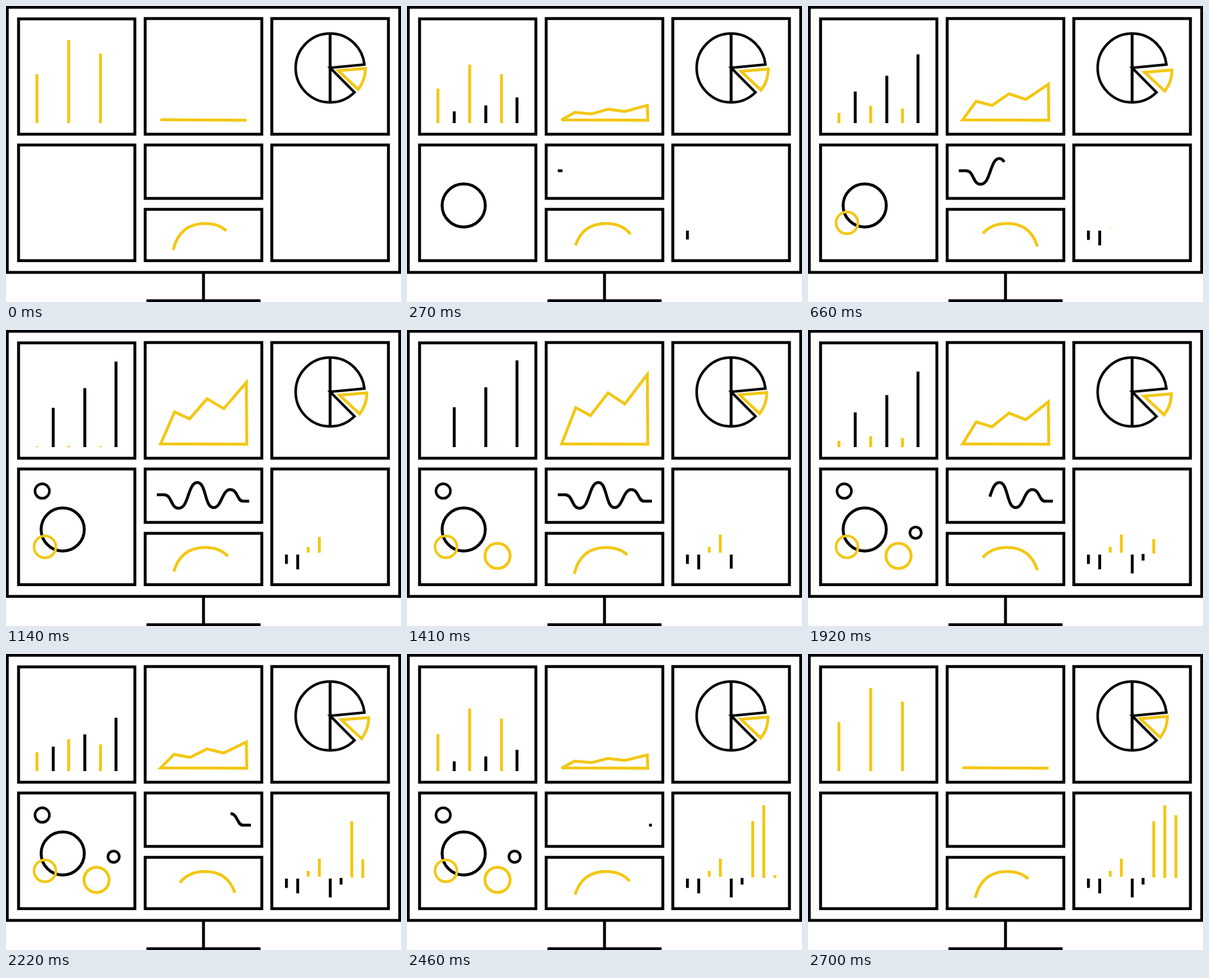
An HTML page with a canvas that plays this animation: 613x460 px, repeating every 2730 ms.

```html
<!DOCTYPE html>
<html lang="en">
<head>
<meta charset="utf-8">
<title>Dashboard</title>
<style>
html, body { margin: 0; width: 100%; height: 100%; overflow: hidden; background: #fff; }
canvas { display: block; }
</style>
</head>
<body>
<canvas id="stage" width="613" height="460"></canvas>
<script>
const ctx = document.getElementById('stage').getContext('2d');
const LOOP = 2730, CYCLE = 2700, HALF = CYCLE / 2, STEP = 30;
const BLACK = '#000', YELLOW = '#f3c713', LINE = 4.5;

const clamp = v => Math.min(1, Math.max(0, v));
const cubicInOut = x => x < .5 ? 4 * x ** 3 : 1 - 4 * (1 - x) ** 3;

function bezierEase(x1, y1, x2, y2) {
  const at = (a, b, u) => 3 * a * u * (1 - u) ** 2 + 3 * b * u * u * (1 - u) + u ** 3;
  return x => {
    let lo = 0, hi = 1;
    for (let i = 0; i < 24; i++) {
      const mid = (lo + hi) / 2;
      if (at(x1, x2, mid) < x) lo = mid; else hi = mid;
    }
    return at(y1, y2, (lo + hi) / 2);
  };
}
const ease = bezierEase(.25, .1, .25, 1);
const easeInOut = bezierEase(.42, 0, .58, 1);

// 0 -> 1 -> 0 over one period
const triangle = (t, period) => 1 - Math.abs(1 - 2 * (t % period) / period);

function stroke(color, path, width = LINE) {
  ctx.strokeStyle = color;
  ctx.lineWidth = width;
  ctx.stroke(path);
}

function line(color, x1, y1, x2, y2, width) {
  const p = new Path2D();
  p.moveTo(x1, y1);
  p.lineTo(x2, y2);
  stroke(color, p, width);
}

function box(x1, y1, x2, y2) {
  const p = new Path2D();
  p.rect(x1, y1, x2 - x1, y2 - y1);
  stroke(BLACK, p);
}

function tracedPath(d) {
  const el = document.createElementNS('http://www.w3.org/2000/svg', 'path');
  el.setAttribute('d', d);
  return { path: new Path2D(d), length: el.getTotalLength() };
}

function strokePart(color, path, from, to) {
  if (to - from < .05) return;
  ctx.setLineDash([to - from, 2000]);
  ctx.lineDashOffset = -from;
  stroke(color, path);
  ctx.setLineDash([]);
}

const wave = tracedPath('M234 256H245C258 256 255 277 268 277C284 277 282 237 297 237' +
  'C311 237 308 276 322 276C335 276 335 248 348 248C360 248 358 266 368 266H380');
const gauge = new Path2D('M259.5 379C266.5 350 284 338 309 338C334 338 350.5 350 357.5 379');

function drawScreen() {
  box(2, 2, 611, 414);
  for (const [x1, x2] of [[19.5, 200], [216, 397], [412.5, 593.5]]) {
    box(x1, x1 < 100 ? 20 : 19.5, x2, 199.3);
    if (x1 !== 216) box(x1, 216, x2, 395.7);
  }
  box(216, 216, 397, 299);
  box(216, 316, 397, 395.7);
  line(BLACK, 306.5, 414, 306.5, 458);
  line(BLACK, 218, 458, 395, 458);
}

function drawBars(t) {
  const k = ease(triangle(t, CYCLE));
  const bar = (color, x, h) => h > .05 && line(color, x, 182, x, 182 - h);
  [[48, 76], [97.3, 129], [146.6, 108]].forEach(([x, h]) => bar(YELLOW, x, h * (1 - k)));
  [[73.3, 62], [122.3, 93], [170.7, 135]].forEach(([x, h]) => bar(BLACK, x, h * k));
}

function drawArea(t) {
  const k = triangle(t, CYCLE);
  if (k === 0) return line(YELLOW, 239.5, 176.8, 373.5, 177.4);
  const p = new Path2D();
  p.moveTo(240, 177);
  [[260 + 2 * k, 59], [286.5 - 2 * k, 46], [312, 83], [338, 65], [373, 113]]
    .forEach(([x, h]) => p.lineTo(x, 177 - h * k));
  p.lineTo(373.7, 177.4);
  p.closePath();
  ctx.miterLimit = 3.6;
  stroke(YELLOW, p);
  ctx.miterLimit = 10;
}

function drawPie(t) {
  const pie = new Path2D();
  pie.moveTo(503, 96);
  pie.arc(503, 96.3, 53.5, Math.PI / 4, Math.PI * 2 - .1);
  pie.closePath();
  stroke(BLACK, pie, 4);
  line(BLACK, 503, 43, 503, 150);

  const k = triangle(t, HALF), dx = 7.2 * k, dy = 2.6 * k;
  const slice = new Path2D();
  slice.moveTo(515.5 + dx, 100.5 + dy);
  slice.arc(504.5 + dx, 97 + dy, 53.3, 0, .66);
  slice.closePath();
  stroke(YELLOW, slice);
}

function drawCircles(t) {
  [[88, 310, 33.5, BLACK], [60.5, 337, 17, YELLOW], [56.2, 250.3, 11.2, BLACK],
   [140.5, 351, 19.5, YELLOW], [167, 315, 8.8, BLACK]].forEach(([x, y, r, color], i) => {
    if (t < 100 + 367 * i) return;
    const p = new Path2D();
    p.arc(x, y, r, 0, Math.PI * 2);
    stroke(color, p, r < 18 ? 4 : LINE);
  });
}

function drawWave(t) {
  const head = cubicInOut(clamp(t / HALF)), tail = cubicInOut(clamp(t / HALF - 1));
  strokePart(BLACK, wave.path, wave.length * tail, wave.length * head);
}

function drawGauge(t) {
  const shift = 28.5 * cubicInOut(triangle(t, HALF));
  strokePart(YELLOW, gauge, shift, shift + 106);
}

function drawCandles(t) {
  [[435.2, 349, 363.5], [452.7, 349, 372], [469, 346, 337], [486.3, 346, 318],
   [503.2, 349, 378.3], [520, 348, 358.3], [536.6, 347.3, 260], [553.7, 348, 235],
   [571, 348, 250]].forEach(([x, from, to], i) => {
    const k = easeInOut(clamp((t - 15 - 300 * i) / 300));
    if (k > .001) line(to > from ? BLACK : YELLOW, x, from, x, from + (to - from) * k);
  });
}

function draw(now) {
  const t = Math.floor(now % LOOP / STEP) * STEP;
  const cycle = t % CYCLE;
  ctx.fillStyle = '#fff';
  ctx.fillRect(0, 0, 613, 460);
  drawScreen();
  [drawBars, drawArea, drawPie, drawCircles, drawWave, drawGauge].forEach(part => part(cycle));
  drawCandles(t);
}

let start;
function tick(now) {
  start ??= now;
  draw(Math.max(0, now - start));
  requestAnimationFrame(tick);
}
draw(0);
requestAnimationFrame(tick);
</script>
</body>
</html>
```
